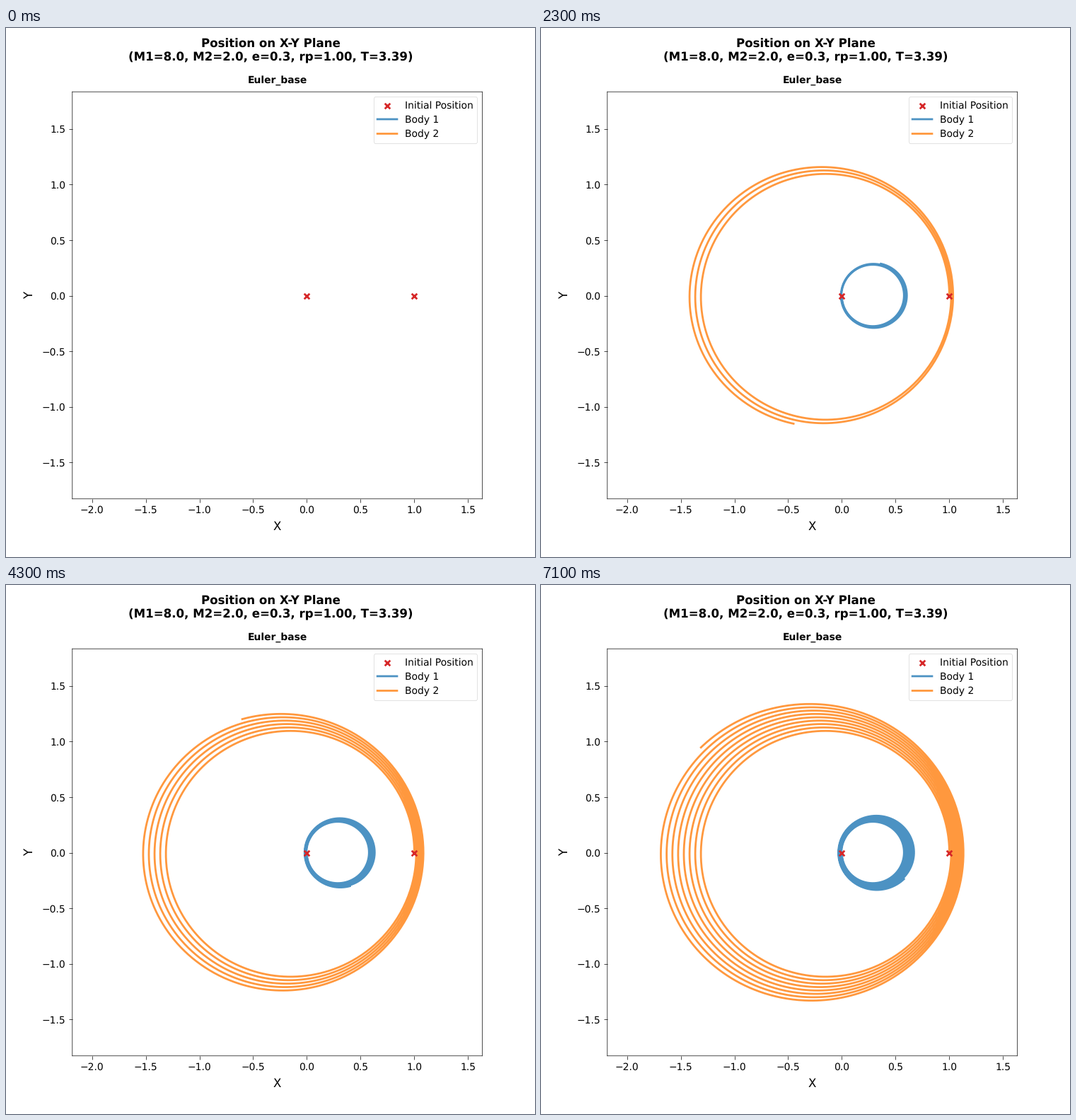
A matplotlib script for the animation above (8 s loop, 748 px wide and 748 px high).

```python
import math

import numpy as np
import matplotlib.pyplot as plt
from matplotlib.animation import FuncAnimation

SIZE, DPI = 748, 100
M1, M2, ECC, RP = 8.0, 2.0, 0.3, 1.0
MU = M1 + M2
PERIOD = 2 * math.pi * math.sqrt((RP / (1 - ECC)) ** 3 / MU)
DT = 0.001
STEPS = int(10 * PERIOD / DT)
SAMPLE_EVERY = 10
SAMPLES_PER_UPDATE = 100
INTERVAL, FRAMES = 100, 80


def euler_orbit():
    """Separation of the two bodies, as complex numbers, by explicit Euler."""
    pos, vel = complex(RP, 0), complex(0, math.sqrt(MU * (1 + ECC) / RP))
    track = []
    for _ in range(STEPS // SAMPLE_EVERY * SAMPLE_EVERY):
        track.append(pos)
        acc = -MU * pos / abs(pos) ** 3
        pos, vel = pos + vel * DT, vel + acc * DT
    return np.array(track[::SAMPLE_EVERY])


separation = euler_orbit()
center = M2 / MU * RP
body1 = center - M2 / MU * separation
body2 = center + M1 / MU * separation

plt.rcParams.update({
    "font.family": "DejaVu Sans",
    "font.size": 10,
    "text.hinting": "none",
    "axes.linewidth": 0.5,
    "xtick.major.width": 0.5,
    "ytick.major.width": 0.5,
    "patch.linewidth": 0.5,
})

fig = plt.figure(figsize=(SIZE / DPI, SIZE / DPI), dpi=DPI, facecolor="white")
left, right, top, bottom = 93.8, 673.4, 90.2, 665.8
ax = fig.add_axes([left / SIZE, 1 - bottom / SIZE,
                   (right - left) / SIZE, (bottom - top) / SIZE])
ax.set_xlim(-2.183, 1.632)
ax.set_ylim(-1.828, 1.835)
ax.set_xticks(np.arange(-2, 1.6, 0.5))
ax.set_yticks(np.arange(-1.5, 1.6, 0.5))
ax.set_xlabel("X", fontsize=12, labelpad=6)
ax.set_ylabel("Y", fontsize=12, labelpad=6)
ax.set_title("Euler_base", fontsize=10, fontweight="bold", pad=9)
fig.suptitle("Position on X-Y Plane\n"
             f"(M1={M1}, M2={M2}, e={ECC}, rp={RP:.2f}, T={PERIOD:.2f})",
             fontsize=12, fontweight="bold")

ax.scatter([0, RP], [0, 0], marker="x", s=30, linewidths=2, color="tab:red",
           zorder=5, label="Initial Position")
trails = [
    (ax.plot([], [], lw=2, alpha=0.8, color=color, label=label)[0], track)
    for color, label, track in (("tab:blue", "Body 1", body1),
                                ("tab:orange", "Body 2", body2))
]
legend = ax.legend(loc="upper right")

# Keep straight strokes at their exact sub-pixel places.
for stroke in [*ax.spines.values(), *legend.get_lines()]:
    stroke.set_snap(False)


def update(frame):
    # Hold for 500 ms, then advance every 200 ms until the run ends.
    updates = max(0, (frame - 3) // 2)
    for line, track in trails:
        shown = track[:updates * SAMPLES_PER_UPDATE]
        line.set_data(shown.real, shown.imag)
    return [line for line, _ in trails]


anim = FuncAnimation(fig, update, frames=FRAMES, interval=INTERVAL,
                     repeat=True, repeat_delay=0, blit=False)
plt.show()
```
